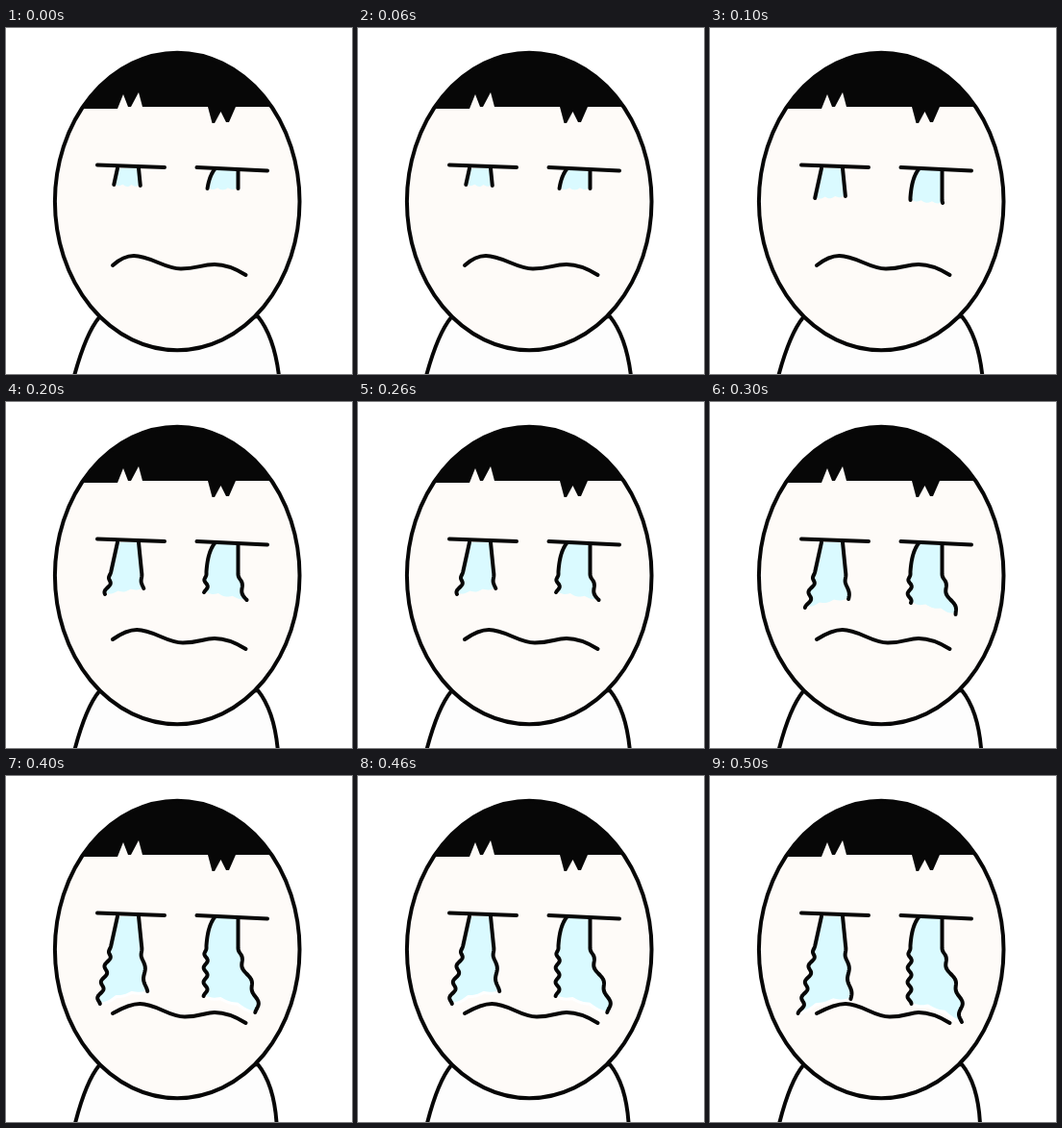
Animation, 360 px wide and 360 px high, one loop 0.6 s. Source, as an HTML page with a canvas:

```html
<!DOCTYPE html>
<html lang="en">
<head>
<meta charset="utf-8">
<title>Tears</title>
<style>
  html, body { margin: 0; width: 100%; height: 100%; overflow: hidden; background: #fff; }
  canvas { display: block; width: 100vw; height: 100vh; object-fit: contain; }
</style>
</head>
<body>
<canvas id="stage" width="360" height="360"></canvas>
<script>
const ctx = document.getElementById('stage').getContext('2d');
const STEP = 100;
const INK = '#070707', SKIN = '#fefbf8', TEAR = '#dafaff';

// How far the tears have run in each pose
const growth = [0, 0.16, 0.43, 0.6, 0.88, 1];

const clamp = v => Math.min(1, Math.max(0, v));
const smooth = v => { v = clamp(v); return v * v * (3 - 2 * v); };

// An edge runs from y = top down to `from`..`to`; `drift` is its course, and
// below the cheekbone it wobbles with its crests at `crest` + n * `period`.
const tears = [
  [
    { top: 146, from: 163, to: 247, drift: y => 116 - 0.22 * (y - 146), amp: 2.2, crest: 189, period: 16.5 },
    { top: 146, from: 164, to: 232, drift: y => 138 + 0.1 * (y - 146), amp: 1.5, crest: 199, period: 26 }
  ],
  [
    { top: 147, from: 167, to: 237, drift: y => 207.5 + 9.5 * Math.exp((147 - y) / 13), amp: 2, crest: 207, period: 15 },
    { top: 148, from: 167, to: 256, drift: y => 241.5 + 19.5 * smooth((y - 175) / 65), amp: 2, crest: 188, period: 24 }
  ]
];

function edgePoints({ top, from, to, drift, amp, crest, period }, grown) {
  const end = from + (to - from) * grown, pts = [];
  for (let y = top; y < end + 1; y++) {
    const wobble = amp * smooth((y - 176) / 12) * Math.cos((y - crest) / period * 2 * Math.PI);
    pts.push([drift(y) + wobble, y]);
  }
  return pts;
}

function hemPoints(a, b, grown) {
  const lift = 6 * grown ** 2 - 1;
  return Array.from({ length: 25 }, (_, i) => {
    const k = i / 24;
    const scallop = Math.abs(Math.sin(k * 3 * Math.PI));
    return [
      a[0] + (b[0] - a[0]) * k,
      a[1] + (b[1] - a[1]) * k - lift * Math.sin(k * Math.PI) + 2 * scallop - 1.5
    ];
  });
}

function trace(pts) {
  const path = new Path2D();
  pts.forEach(p => path.lineTo(...p));
  return path;
}

function fill(path, color) {
  ctx.fillStyle = color;
  ctx.fill(path);
}

function line(path, width = 4, color = INK) {
  ctx.lineWidth = width;
  ctx.strokeStyle = color;
  ctx.stroke(path);
}

function drawTear(edges, grown) {
  const [left, right] = edges.map(edge => edgePoints(edge, grown));
  const hem = hemPoints(left.at(-1), right.at(-1), grown);
  if (grown > 0.8) line(trace(hem), 6, '#fff');
  fill(trace([...left, ...hem, ...right.slice().reverse()]), TEAR);
  line(trace(left));
  line(trace(right));
}

function drawBody(pose) {
  const l = 71 + pose * 0.2, r = 284 - pose * 0.6;
  const body = new Path2D(`M${l} 362Q83 318 97 301L262 300Q279 321 ${r} 362`);
  fill(body, '#fdfdfd');
  line(body);
}

function drawHead() {
  const head = new Path2D();
  head.ellipse(178.2, 180.5, 127.3, 154.7, 0, 0, Math.PI * 2);
  fill(head, SKIN);

  ctx.save();
  ctx.clip(head);
  fill(new Path2D('M40 20H320V82H239L232 98H229L223.5 87L217 99H214.5L210 82H142L138 67L130 82H127L122 69L116 84H40Z'), INK);
  ctx.restore();
  line(head);
}

// A wave through crest, trough and crest, each with a level tangent
function drawMouth(pose) {
  const crest = 133 + pose * 1.6, trough = 182 + pose;
  line(new Path2D(`M111 247Q${crest - 11} 237 ${crest} 237
    C${crest + 17} 237 ${trough - 17} 250.5 ${trough} 250.5
    S${trough + 21} 246 217 246Q232 246 249.5 257`));
}

function draw(pose) {
  fill(new Path2D('M0 0H360V360H0Z'), '#fff');
  ctx.lineCap = ctx.lineJoin = 'round';
  drawBody(pose);
  drawHead();
  tears.forEach(edges => drawTear(edges, growth[pose]));
  line(new Path2D('M95 142.5L165 145M198.5 145L272 148.5'));
  drawMouth(pose);
}

function tick() {
  draw(Math.floor(performance.now() / STEP) % growth.length);
  requestAnimationFrame(tick);
}
tick();
</script>
</body>
</html>
```
